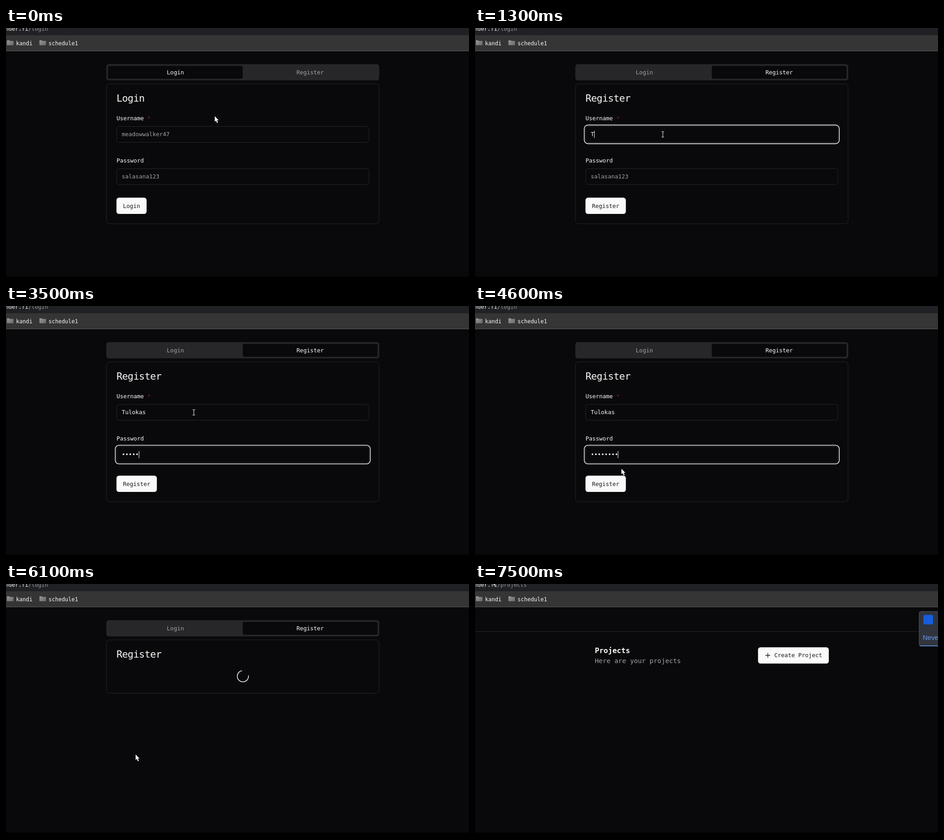
An HTML page for the animation above (7600 ms loop, 1018 by 550 pixels).

```html
<!DOCTYPE html>
<html lang="en">
<head>
<meta charset="utf-8">
<title>Sign-up demo</title>
<style>
  html, body { margin: 0; width: 100%; height: 100%; overflow: hidden; background: #09090b; }
  svg { display: block; width: 1018px; height: 550px; }
  text { font: 12.5px "DejaVu Sans Mono", monospace; fill: #fafafa; white-space: pre; }
  .bar text { font-size: 12px; }
  .title { font-size: 21.43px; letter-spacing: -.535px; }
  .dim, .bar .dim { fill: #a1a1aa; }
  .bar .path { fill: #96979b; }
  .mid { text-anchor: middle; }
  .line { fill: none; stroke: #27272a; }
  .ring { fill: none; stroke: #d4d4d8; stroke-width: 1.8; }
  .dark { fill: #18181b; }
  .req { fill: #7f1d1d; }
  .heading { font-size: 16.07px; font-weight: bold; }
  .sub { font-size: 14.29px; }
  .never { font: 14.6px "Liberation Sans", Arial, sans-serif; fill: #6a99f0; }
  .pointer path { stroke-linejoin: round; }
</style>
</head>
<body>
<svg viewBox="0 0 1018 550">
  <defs>
    <linearGradient id="metal" x2="1" y2="1">
      <stop stop-color="#999"/><stop offset="1" stop-color="#686868"/>
    </linearGradient>
    <path id="folder" d="M0 1q0-1 1-1h4l1.5 1.500h7q1 0 1 1v7.500q0 1-1 1h-12.500q-1 0-1-1z" fill="url(#metal)"/>
  </defs>

  <rect width="1018" height="550" fill="#09090b"/>
  <rect y="547" width="1018" height="3" fill="#000"/>

  <g class="bar">
    <rect width="1018" height="16" fill="#202124"/>
    <rect y="16" width="1018" height="34" fill="#353535"/>
    <rect y="50" width="1018" height="1" fill="#5c5c5c"/>
    <text x="-1.700" y="6">nder.fi<tspan class="path" id="route">/login</tspan></text>
    <use href="#folder" x="2" y="27"/>
    <text x="22" y="37.500">kandi</text>
    <use href="#folder" x="73.500" y="27"/>
    <text x="93.500" y="37.500">schedule1</text>
  </g>

  <g id="auth">
    <rect x="220.600" y="79.600" width="600" height="35.700" rx="5.400" fill="#27272a"/>
    <rect id="pill" y="83.200" width="296.400" height="28.500" rx="3.600" fill="#09090b"/>
    <text class="mid" id="tabLogin" x="372.400" y="101.700">Login</text>
    <text class="mid" id="tabRegister" x="668.800" y="101.700">Register</text>
    <rect class="line" id="card" x="221" y="122.900" width="599.200" rx="7"/>
    <text class="title" id="title" x="242.900" y="162.400"></text>

    <g id="form">
      <text x="242.900" y="202.500">Username <tspan class="req">*</tspan></text>
      <rect class="line" x="243.300" y="216.600" width="554.600" height="34.900" rx="5"/>
      <rect class="ring" id="userRing" x="240.300" y="213.500" width="560.600" height="41" rx="8"/>
      <text id="user" x="254.500" y="238.300"></text>

      <text x="242.900" y="295.500">Password</text>
      <rect class="line" x="243.300" y="309.500" width="554.600" height="34.900" rx="5"/>
      <rect class="ring" id="passRing" x="240.300" y="306.400" width="560.600" height="41" rx="8"/>
      <text id="pass" x="254.500" y="331.300"></text>

      <rect id="caret" width="1" height="16" fill="#fafafa"/>
      <rect id="button" x="242.900" y="373.300" height="35.700" rx="5.400"/>
      <text class="dark" id="buttonText" x="257.200" y="395.500"></text>
    </g>

    <path id="spinner" d="M-10.400 10.400A14.700 14.700 0 1 1 10.400 10.400" fill="none" stroke="#fafafa" stroke-width="1.800"/>
  </g>

  <g id="projects">
    <rect y="104" width="1018" height="1" fill="#27272a"/>
    <text class="heading" x="263.500" y="151.600">Projects</text>
    <text class="sub dim" x="263.500" y="174">Here are your projects</text>
    <rect x="622.300" y="139.200" width="155.600" height="35.800" rx="5.400" fill="#fafafa"/>
    <path d="M639 157h9.600M643.800 152.200v9.600" stroke="#18181b" stroke-width="1.300" stroke-linecap="round"/>
    <text class="dark" x="658" y="161.400">Create Project</text>
  </g>

  <g id="popup">
    <rect x="976.500" y="60.500" width="60" height="76" rx="4" fill="#2f343d" stroke="#4c525f"/>
    <rect x="978" y="135.500" width="40" height="1.500" fill="#6a99f0"/>
    <rect x="986" y="68" width="21" height="21" rx="3" fill="#175ddc"/>
    <text class="never" x="984.500" y="122.600">Never</text>
  </g>

  <g class="pointer" id="pointer">
    <path id="arrow" d="M0 0V12.200L2.800 9.700 5 14.900 7.100 14 4.900 9H8.500Z" fill="#fff" stroke="#000" stroke-width=".8" paint-order="stroke"/>
    <path id="hand" d="M-2 1Q-2-.5-.700-.5T.600 1V5L6 6Q7.500 6.300 7.500 8L6.800 13.300H-1.200L-5.500 8.500Q-5.800 6.800-4 7L-2 8Z" fill="#fff" stroke="#000" stroke-width=".8" paint-order="stroke"/>
    <g id="beam" fill="none">
      <path d="M-3-6H3M0-6V6M-3 6H3" stroke="#000" stroke-width="2.600"/>
      <path d="M-3-6H3M0-6V6M-3 6H3" stroke="#e8e8e8" stroke-width="1.200"/>
    </g>
  </g>
</svg>

<script>
const LOOP = 7600, STEP = 100, CHAR = 7.525;
const SWITCH = 500, FOCUS_USER = 900, FOCUS_PASS = 2500;
const SUBMIT = 4900, DONE = 6300, POPUP = 6500;
const NAME = "Tulokas";

// [time, typed characters]
const userKeys = [[1300, 1], [1600, 2], [1800, 3], [1900, 4], [2100, 5], [2200, 7]];
const passKeys = [[3100, 1], [3200, 2], [3400, 3], [3500, 5], [3800, 6], [4000, 7], [4100, 8]];

// [time, x, y] of the pointer's hot spot
const path = [
  [0, 459, 194], [100, 470, 188], [200, 512, 162], [300, 575, 124], [400, 625, 101],
  [500, 641, 94], [600, 640, 91], [700, 510, 180], [800, 413, 234],
  [4300, 413, 234], [4400, 404, 252], [4500, 368, 312], [4600, 322, 358],
  [4700, 297, 378], [4800, 292, 381], [5900, 292, 381], [6000, 290, 380],
  [6100, 285, 375], [6200, 262, 361], [6400, 182, 311], [6500, 162, 298],
  [6600, 162, 298], [6700, 155, 284], [7000, 88, 140], [7300, 16, 4],
  [7400, 7, -11], [7500, 37, -11], [7600, 37, -11]
];

const el = {};
document.querySelectorAll("[id]").forEach(n => el[n.id] = n);
const set = (n, attrs) => { for (const k in attrs) n.setAttribute(k, attrs[k]); };
const show = (n, on) => { n.style.display = on ? "" : "none"; };
const say = (n, s) => { if (n.textContent !== s) n.textContent = s; };
const typed = (keys, t) => keys.reduce((n, [at, count]) => t >= at ? count : n, 0);

function locate(t) {
  const i = path.findIndex(p => p[0] > t);
  const [t0, x0, y0] = path[i - 1], [t1, x1, y1] = path[i];
  const k = (t - t0) / (t1 - t0);
  return [x0 + (x1 - x0) * k, y0 + (y1 - y0) * k];
}

function pointerKind(t, x, y) {
  const inside = (l, top, r, b) => x > l && x < r && y > top && y < b;
  if (t >= SUBMIT) return "arrow";
  if (inside(224, 83, 817, 112) || inside(243, 373, 331, 409)) return "hand";
  if (inside(243, 216, 798, 252) || inside(243, 309, 798, 345)) return "beam";
  return "arrow";
}

function field(node, value, hint) {
  say(node, value || hint);
  node.setAttribute("class", value ? "" : "dim");
}

function render(t) {
  const registering = t >= SWITCH, loading = t >= SUBMIT, done = t >= DONE;
  const label = registering ? "Register" : "Login";
  const [x, y] = locate(t), kind = pointerKind(t, x, y);

  show(el.auth, !done);
  show(el.projects, done);
  show(el.popup, t >= POPUP);
  say(el.route, done ? "/projects" : "/login");

  set(el.pill, { x: registering ? 520.6 : 224.2 });
  set(el.tabLogin, { class: registering ? "mid dim" : "mid" });
  set(el.tabRegister, { class: registering ? "mid" : "mid dim" });
  say(el.title, label);
  say(el.buttonText, label);
  set(el.button, {
    width: 28.6 + CHAR * label.length,
    fill: kind === "hand" && y > 300 ? "#e2e2e2" : "#fafafa"
  });
  set(el.card, { height: loading ? 117.6 : 307.8 });
  show(el.form, !loading);
  show(el.spinner, loading);

  const users = typed(userKeys, t), dots = typed(passKeys, t);
  const onPass = t >= FOCUS_PASS;
  field(el.user, NAME.slice(0, users), "meadowwalker47");
  field(el.pass, "•".repeat(dots), "salasana123");
  show(el.userRing, t >= FOCUS_USER && !onPass);
  set(el.userRing, { opacity: t < FOCUS_USER + STEP ? .5 : 1 });
  show(el.passRing, onPass);
  show(el.caret, t >= FOCUS_USER);
  set(el.caret, { x: Math.floor(254.5 + CHAR * (onPass ? dots : users)), y: onPass ? 319 : 226 });

  const turn = Math.max(0, t - SUBMIT) / 750 % 1;
  const scale = .8 + .4 * Math.abs(turn - .5);
  set(el.spinner, { transform: `translate(520.8 203) rotate(${turn * 360}) scale(${scale})` });

  set(el.pointer, { transform: `translate(${x} ${y})` });
  for (const k of ["arrow", "hand", "beam"]) show(el[k], k === kind);
}

const start = performance.now();
function tick() {
  const t = (performance.now() - start) % LOOP;
  render(Math.floor(t / STEP) * STEP);
  requestAnimationFrame(tick);
}
tick();
</script>
</body>
</html>
```
